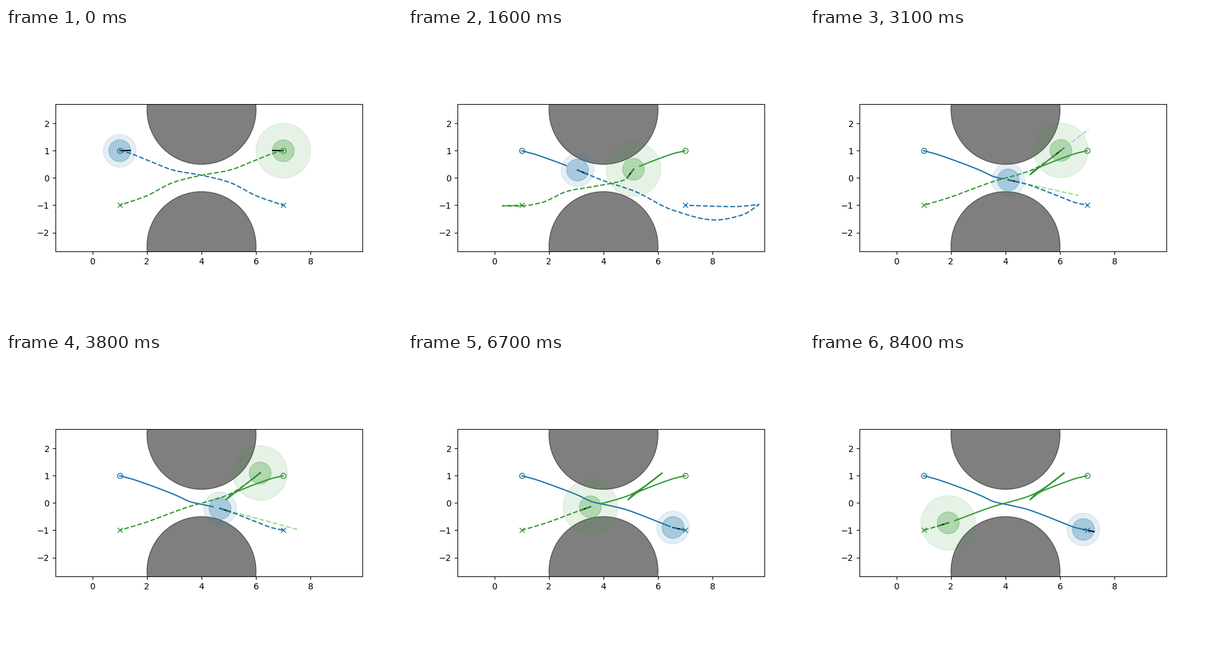
Recreate the animation shown at these times as a matplotlib script. Size 640 px wide and 480 px high, loop 8.5 s.

```python
import numpy as np
import matplotlib.pyplot as plt
from matplotlib.animation import FuncAnimation
from matplotlib.patches import Circle

FRAMES, STEP = 85, 0.1        # frame count, seconds per frame
LAG = 0.3                     # the driven trail is drawn this far behind
REPLAN, SETTLE = 1.25, 1.85   # times at which the plans are replaced
HORIZON = 3.6                 # seconds covered by a straight forecast
NOSE = 0.4


def smooth(keys, t):
    """Monotone cubic interpolation of rows (t, x, y)."""
    keys = np.asarray(keys, float)
    t = np.clip(np.atleast_1d(t), keys[0, 0], keys[-1, 0])
    x, v = keys[:, 0], keys[:, 1:]
    h = np.diff(x)[:, None]
    d = np.diff(v, axis=0) / h
    m = np.vstack([d[:1], d])
    w1, w2 = 2 * h[1:] + h[:-1], h[1:] + 2 * h[:-1]
    same = d[:-1] * d[1:] > 0
    a, b = np.where(same, d[:-1], 1), np.where(same, d[1:], 1)
    m[1:-1] = np.where(same, (w1 + w2) / (w1 / a + w2 / b), 0)
    i = np.clip(np.searchsorted(x, t, side="right") - 1, 0, len(x) - 2)
    s, k = ((t - x[i]) / h[i, 0])[:, None], h[i]
    return ((1 + 2 * s) * (1 - s) ** 2 * v[i] + s * (1 - s) ** 2 * k * m[i]
            + s * s * (3 - 2 * s) * v[i + 1] + s * s * (s - 1) * k * m[i + 1])


def lengths(p):
    return np.r_[0, np.cumsum(np.hypot(*np.diff(p, axis=0).T))]


def curve(*points):
    """Smooth curve through points, spaced by chord length."""
    c = lengths(points)
    return smooth(np.column_stack([c, points]), np.linspace(0, c[-1], 160))


# way points: time, x, y
BLUE_PATH = [(0, 1, 1), (.5, 1.38, .9), (1.6, 3.05, .29), (2.3, 3.6, .04),
             (3.1, 4.1, -.07), (3.8, 4.68, -.2), (5.2, 5.78, -.6),
             (6.7, 6.55, -.9), (9.4, 7, -1)]
# the green robot yields: it backs up between BACK[0] and BACK[1]
BACK = (1.9, 3.8)
GREEN_PATH = [(0, 7, 1), (.5, 6.65, .92), (1.3, 5.33, .43), (1.6, 5.1, .32),
              (BACK[0], 4.9, .12), (3.1, 6.03, 1.01), (BACK[1], 6.15, 1.1),
              (5.2, 5.42, .55), (5.6, 4.98, .3), (6.7, 3.52, -.14),
              (8.4, 1.9, -.73), (9.8, 1, -1)]

FIRST = curve((1, 1), (1.3, .93), (2, .66), (3, .28), (4, .1), (5, -.15),
              (6, -.65), (7, -1))
BLUE_SECOND = curve((3.05, .29), (4, -.1), (5.1, -.47), (6.6, -1.2),
                    (8.1, -1.54), (9.1, -1.35), (9.7, -.97), (8.8, -1.05),
                    (7, -1))
GREEN_SECOND = curve((5.1, .32), (4.8, -.05), (4, -.25), (2.7, -.48),
                     (1.7, -.91), (.9, -1.03), (.3, -1.02), (1, -1))

fig, ax = plt.subplots(figsize=(6.4, 4.8), dpi=100)
ax.set_aspect("equal")
ax.set_xlim(-1.354, 9.9)
ax.set_ylim(-2.7, 2.7)
ax.set_xticks(range(0, 9, 2))
ax.set_yticks(range(-2, 3))
for cy in (2.5, -2.5):
    ax.add_patch(Circle((4, cy), 2, color="k", alpha=0.5))


class Robot:
    def __init__(self, path, first, second, color, reach, cast_color,
                 cast_until, back=None):
        self.path, self.first, self.second = path, first, second
        self.cast_until, self.back = cast_until, back
        start, goal = path[0][1:], path[-1][1:]
        self.side = np.sign(goal[0] - start[0])
        self.discs = [ax.add_patch(Circle(start, r, color=color, alpha=a))
                      for r, a in ((reach, 0.12), (0.4, 0.3))]
        self.cast, = ax.plot([], [], "--", color=cast_color, zorder=2)
        self.nose, = ax.plot([], [], "k-", zorder=2.1)
        self.trail, = ax.plot([], [], "-", color=color, zorder=2.2)
        self.plan, = ax.plot([], [], "--", color=color, zorder=2.3)
        ax.plot(*start, "o", color=color, mfc="none", zorder=2.4)
        ax.plot(*goal, "x", color=color, zorder=2.4)

    def at(self, t):
        return smooth(self.path, t)

    def plan_points(self, t, pos):
        if t > SETTLE:
            return self.at(np.linspace(t, self.path[-1][0], 160))
        pts = self.first if t < REPLAN else self.second
        ahead = pts[(pts[:, 0] - pos[0]) * self.side > 0.03]
        return np.vstack([pos, ahead])

    def heading(self, t, pos, plan):
        if self.back and self.back[0] - 0.01 < t < self.back[1] + 0.01:
            # reversing: keep facing the gap
            aim = self.at(self.back[0])[0] - (0.01, 0.01)
        else:
            near = np.searchsorted(lengths(plan), NOSE)
            aim = plan[min(near, len(plan) - 1)]
        way = (aim - pos) * (1, min(t / 0.4, 1))   # starts out level
        return way / np.hypot(*way)

    def draw(self, t):
        pos = self.at(t)[0]
        plan = self.plan_points(t, pos)
        for disc in self.discs:
            disc.center = pos
        tip = pos + NOSE * self.heading(t, pos, plan)
        self.nose.set_data(*np.array([pos, tip]).T)
        self.plan.set_data(*plan.T)

        past = max(t - LAG, 0)
        self.trail.set_data(*self.at(np.linspace(0, past, 160)).T)

        speed = (self.at(t + 0.01)[0] - self.at(t - 0.01)[0]) / 0.02
        self.cast.set_data(*np.array([pos, pos + HORIZON * speed]).T)
        self.cast.set_visible(SETTLE < t < self.cast_until)


tab = plt.get_cmap("tab20").colors
blue, green = (0.13, 0.46, 0.65), (0.2, 0.6, 0.2)
robots = [
    Robot(BLUE_PATH, FIRST, BLUE_SECOND, blue, 0.6, tab[5], 5.65),
    Robot(GREEN_PATH, FIRST * (-1, 1) + (8, 0), GREEN_SECOND, green, 1.0,
          tab[1], 3.65, BACK)]


def update(i):
    for robot in robots:
        robot.draw(i * STEP)
    return []


anim = FuncAnimation(fig, update, frames=FRAMES, interval=1000 * STEP,
                     init_func=lambda: update(0), repeat=True)
plt.show()
```
